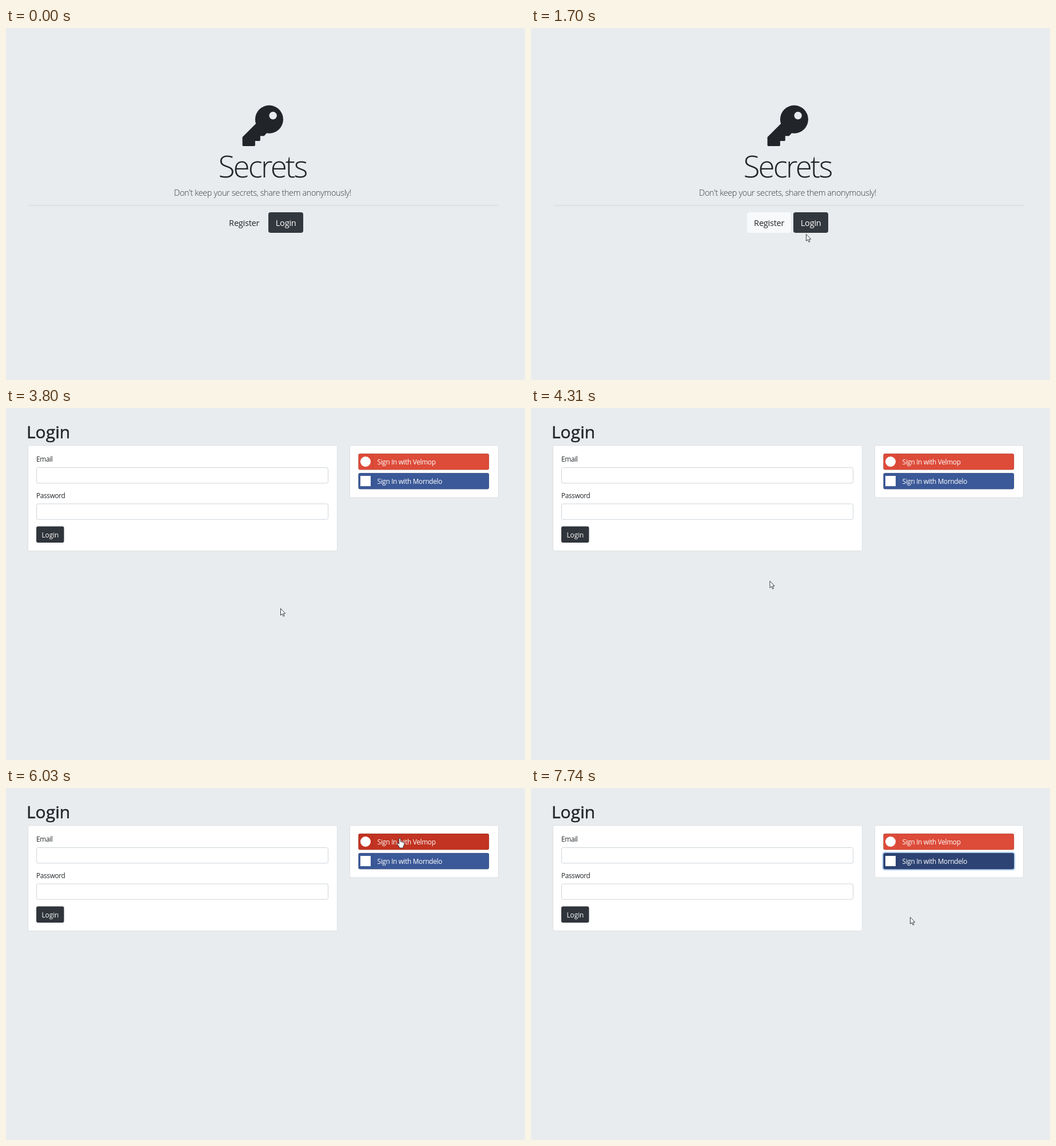
These frames come from a looping animation (908 px wide and 617 px high, 8 s). An HTML page:

```html
<!DOCTYPE html>
<html lang="en">
<head>
<meta charset="utf-8">
<title>Secrets</title>
<style>
  html, body { margin: 0; width: 100%; height: 100%; overflow: hidden; background: #e8ecee; }
  svg { display: block; width: 100vw; height: 100vh; }
  text { font-family: "Open Sans", "Noto Sans", sans-serif; fill: #212529; }
  .mid { text-anchor: middle; }
  .light { font-weight: 300; }
  .white { fill: #fff; }
  .btn { font-size: 14.6px; letter-spacing: -.25px; }
  .small { font-size: 11.8px; }
  .tight { letter-spacing: -.32px; }
  .head { font-size: 30px; stroke: #212529; stroke-width: .5; }
  .card { fill: #fff; stroke: #dddfe1; }
  .field { fill: #fff; stroke: #ced4da; }
</style>
</head>
<body>
<svg viewBox="0 0 908 617">
  <g id="home">
    <g transform="translate(413.6 135.6) scale(.1394)" fill="#212529">
      <circle cx="336" cy="176" r="176"/>
      <path d="M12 405L190 227L300 335L268 372H212V436H148V500H12Z" stroke="#212529" stroke-width="24" stroke-linejoin="round"/>
      <circle cx="384" cy="128" r="48" fill="#e8ecee"/>
    </g>
    <text class="mid light" x="448.5" y="262" font-size="53" letter-spacing="-2.9">Secrets</text>
    <text class="mid light" x="449" y="294" font-size="14.5" letter-spacing="-.38" fill-opacity=".9">Don't keep your secrets, share them anonymously!</text>
    <path d="M40 311H862" stroke="#d2d5d8"/>
    <rect id="register" x="378" y="323" width="77" height="36" rx="4" fill="#f8f9fa"/>
    <text class="mid btn" x="416.7" y="347">Register</text>
    <rect id="enter" x="459" y="323" width="61" height="36" rx="4"/>
    <text class="mid btn white" x="489.7" y="347">Login</text>
  </g>

  <g id="login">
    <text class="head" x="36" y="53">Login</text>
    <rect class="card" x="38.5" y="65.5" width="541" height="185" rx="3"/>
    <g id="form"></g>
    <rect x="53" y="207.5" width="48.5" height="28.5" rx="3" fill="#30353b"/>
    <text class="mid small white" x="77.4" y="227">Login</text>
    <rect class="card" x="601.5" y="65.5" width="260" height="91.5" rx="3"/>
    <g id="social"></g>
  </g>

  <g id="cursor" fill="#fff" stroke="#22252b" stroke-width=".9" stroke-linejoin="round">
    <path id="arrow" d="M.5 .5V12.3L3.2 9.8L5.2 14.2L7 13.4L5.1 9.1H8.7Z"/>
    <path id="hand" d="M-1.4 1Q0-1 1.3 1V6L6 7Q7.6 7 7.6 9V11.5L6 15V17H-1V15L-4.5 10.6Q-5 8-3 8.7L-1.4 10.4Z"/>
  </g>
</svg>
<script>
const LOOP = 8000, SWITCH = 3660, PRESS = 7180;
const $ = id => document.getElementById(id);

const field = (label, y) => `
  <text class="small tight" x="53" y="${y - 10.5}">${label}</text>
  <rect class="field" x="53.5" y="${y}" width="510" height="27.3" rx="3"/>`;

const social = (id, label, y, radius) => `
  <rect id="${id}Ring" x="614.2" y="${y - 2.3}" width="233.1" height="32.9" rx="5" fill="#b9d6fa"/>
  <rect id="${id}" x="616.5" y="${y}" width="228.5" height="28.3" rx="3" stroke="#000" stroke-opacity=".15"/>
  <path d="M641.5 ${y}v28" stroke="#000" stroke-opacity=".1"/>
  <rect x="620" y="${y + 5}" width="18" height="18" rx="${radius}" fill="#fff"/>
  <text class="small tight white" x="649.5" y="${y + 19}">Sign In with ${label}</text>`;

$("form").innerHTML = field("Email", 104.5) + field("Password", 168);
$("social").innerHTML = social("red", "Velmop", 80, 9) + social("blue", "Morndelo", 114, 0);

// Pointer moves, each starting where the last one ended
const start = { x: 785, y: 620 };
const moves = [
  { from: 450, to: 900, x: 752, y: 389 },
  { from: 900, to: 1700, x: 481, y: 361 },
  { from: 1700, to: 1900, x: 483, y: 344.5 },
  { from: 3320, to: 3520, x: 480, y: 351 },
  { from: 3900, to: 4970, x: 290, y: 205 },
  { from: 4970, to: 5630, x: 689, y: 88 },
  { from: 6480, to: 6880, x: 678, y: 124 },
  { from: 7250, to: 7740, x: 663, y: 226 }
];

const ramp = (t, from, to = from + 150) => Math.min(1, Math.max(0, (t - from) / (to - from)));
const ease = k => k * k * (3 - 2 * k);
const lerp = (a, b, k) => a + (b - a) * k;

function pointer(t) {
  return moves.reduce((p, m) => {
    const k = ease(ramp(t, m.from, m.to));
    return { x: lerp(p.x, m.x, k), y: lerp(p.y, m.y, k) };
  }, start);
}

function over(id, { x, y }) {
  const [l, top, w, h] = ["x", "y", "width", "height"].map(n => +$(id).getAttribute(n));
  return x >= l && x <= l + w && y >= top && y <= top + h;
}

const show = (id, on) => $(id).setAttribute("display", on ? "inline" : "none");
const fade = (id, k) => $(id).setAttribute("opacity", k);

function fill(id, a, b, k) {
  $(id).setAttribute("fill", `rgb(${a.map((v, i) => Math.round(lerp(v, b[i], k)))})`);
}

function draw(t) {
  const home = t < SWITCH, p = pointer(t);
  show("home", home);
  show("login", !home);

  fade("register", ramp(t, 100));
  fill("enter", [51, 56, 63], [38, 42, 48], ramp(t, 1780));
  fill("red", [221, 75, 57], [194, 51, 33], ramp(t, 5560) - ramp(t, 6700));
  fill("blue", [59, 89, 152], [45, 67, 115], ramp(t, 6740));
  fade("redRing", 0);
  fade("blueRing", ramp(t, PRESS));

  const hit = (home ? ["register", "enter"] : ["red", "blue"]).some(id => over(id, p));
  show("hand", hit);
  show("arrow", !hit);
  $("cursor").setAttribute("transform", `translate(${p.x.toFixed(2)} ${p.y.toFixed(2)})`);
}

function tick() {
  draw(performance.now() % LOOP);
  requestAnimationFrame(tick);
}
tick();
</script>
</body>
</html>
```
